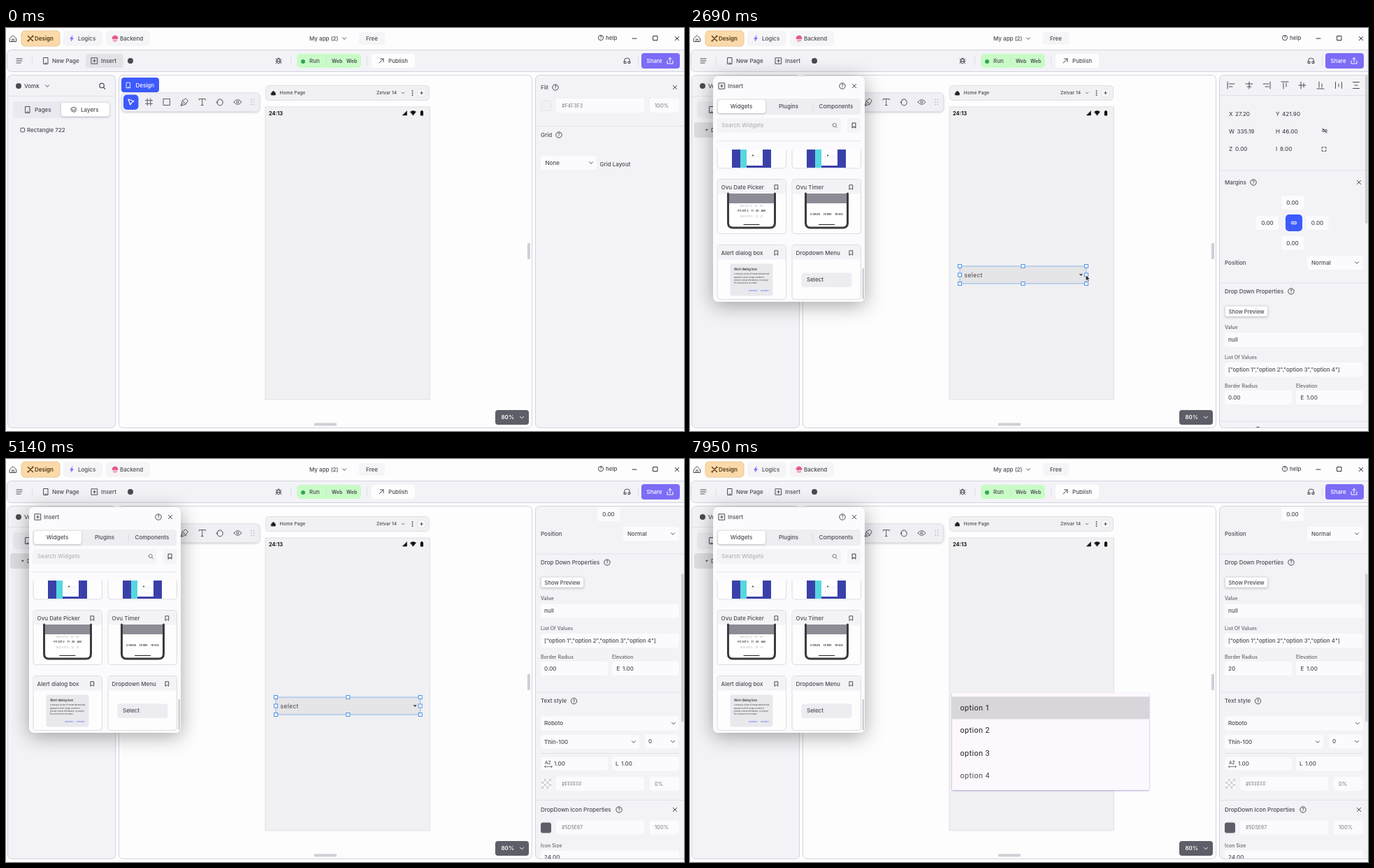
Write an HTML page that moves like this. It is 970 by 577 pixels and loops after 7990 ms.

```html
<!DOCTYPE html>
<html lang="en">
<head>
<meta charset="utf-8">
<title>App builder</title>
<style>
html, body { margin: 0; width: 100%; height: 100%; overflow: hidden; background: #fdfdfe; }
svg { display: block; width: 970px; height: 577px; }
text { font-family: Inter, sans-serif; white-space: pre; }
.material text { font-family: Roboto, sans-serif; }
.soft { filter: drop-shadow(0 1px 1.5px #0003); }
.deep { filter: drop-shadow(0 5px 14px #00000059); }
</style>
</head>
<body>
<svg id="stage" viewBox="0 0 970 577"></svg>
<script>
const LOOP = 7990, SCALE = 0.54;
const INK = '#4a4a52', PANEL = '#f3f3f7', EDGE = '#d2d2df', FIELD = '#fbfbfd', BLUE = '#3d5afe';

// Drawing helpers; text is placed by its vertical centre.
const text = (x, y, s, { size = 8, fill = INK, weight = 500, anchor = 'start', id = '', gap = 0 } = {}) =>
  `<text x="${x}" y="${y + size * 0.36}" font-size="${size}" font-weight="${weight}" fill="${fill}"
    text-anchor="${anchor}" letter-spacing="${gap}" ${id && `id="${id}"`}>${s}</text>`;
const rect = (x, y, w, h, fill, r = 0, stroke = 'none', extra = '') =>
  `<rect x="${x}" y="${y}" width="${w}" height="${h}" rx="${r}" fill="${fill}" stroke="${stroke}" ${extra}/>`;
const path = (d, stroke = INK, width = 1, fill = 'none') =>
  `<path d="${d}" stroke="${stroke}" stroke-width="${width}" fill="${fill}" stroke-linecap="round" stroke-linejoin="round"/>`;
const circle = (x, y, r, fill, stroke = 'none') => `<circle cx="${x}" cy="${y}" r="${r}" fill="${fill}" stroke="${stroke}"/>`;
const group = (attrs, ...parts) => `<g ${attrs}>${parts.join('')}</g>`;
const rule = (x1, x2, y) => path(`M${x1} ${y}H${x2}`, '#dcdce4', 0.8);
const bar = (x, y = 47) => path(`M${x} ${y - 6}v12`, '#d8d8df', 0.8);

const ICONS = {
  down: 'M-2.5 -1.2L0 1.3L2.5 -1.2',
  close: 'M-2.7 -2.7L2.7 2.7M2.7 -2.7L-2.7 2.7',
  home: 'M-4.5 0L0 -4.5L4.5 0V4.5H-4.5ZM-1.3 4.5V1H1.3V4.5',
  tools: 'M-3.5 -3.5L3.5 3.5M3.5 -3.5L-3.5 3.5M-4 3L-3 4M3 -4L4 -3',
  bolt: 'M1 -4L-2.5 .8H0L-1 4L2.5 -.8H0Z',
  menu: 'M-4 -3H4M-4 0H4M-4 3H2',
  page: 'M-3 -4.5H3V4.5H-3ZM-1 3H1',
  insert: 'M-4.2 -4.2H4.2V4.2H-4.2ZM-2 0H2M0 -2V2',
  bug: 'M-2 -2.5H2V2.5L0 4L-2 2.5ZM-4 -2.5L-2 -1M4 -2.5L2 -1M-4 .7H4M-4 3.7L-2 2M4 3.7L2 2M-1 -3.8H1',
  out: 'M-3 3L3 -3M-1.5 -3H3V1.5',
  head: 'M-4 2V0A4 4 0 0 1 4 0V2M-4 1H-1.5V3.5H-4ZM4 1H1.5V3.5H4Z',
  share: 'M-4 0V4H4V0M0 1.5V-4.5M-2.3 -2.3L0 -4.5L2.3 -2.3',
  search: 'M-3 -.5A2.7 2.7 0 1 0 2.4 -.5A2.7 2.7 0 1 0 -3 -.5M1.7 1.7L3.6 3.6',
  bookmark: 'M-2.2 -3.2H2.2V3.2L0 1.5L-2.2 3.2Z',
  arrow: 'M-4 -4L4 -1.2L.8 .6L-1.2 4Z',
  frame: 'M-5 -2.3H5M-5 2.3H5M-2.3 -5V5M2.3 -5V5',
  box: 'M-4.5 -4.5H4.5V4.5H-4.5Z',
  pen: 'M-5 5L-3 -2L2 -5L5 -2L2 3ZM-5 5L0 0M-3 -2L2 3',
  type: 'M-4.5 -3V-4.5H4.5V-3M0 -4.5V4.5M-1.5 4.5H1.5',
  hand: 'M-3.5 1V-2.5Q-2.5 -4 -1.5 -2.5V-4Q-.5 -5.5 .5 -4V-3.5Q1.5 -5 2.3 -3.5V-2Q3.5 -3 4 -1.5V2Q3 5 0 5Q-3 5 -5 0Q-4 -1 -3.5 1',
  eye: 'M-5.5 0Q0 -7 5.5 0Q0 7 -5.5 0M-1.5 0A1.5 1.5 0 1 0 1.5 0A1.5 1.5 0 1 0 -1.5 0',
  layers: 'M-4 -1.5L0 -4L4 -1.5L0 1ZM-4 1L0 3.5L4 1',
  link: 'M-.8 -1.8H-2A1.8 1.8 0 0 0 -2 1.8H-.8M.8 -1.8H2A1.8 1.8 0 0 1 2 1.8H.8M-1.7 0H1.7',
  expand: 'M-3.2 -1V-3.2H-1M1 -3.2H3.2V-1M3.2 1V3.2H1M-1 3.2H-3.2V1'
};
const icon = (name, x, y, { color = INK, width = 1, fill = 'none', size = 1 } = {}) =>
  group(`transform="translate(${x} ${y}) scale(${size})"`, path(ICONS[name], color, width, fill));
const help = (x, y, r = 4.2) => circle(x, y, r, 'none', INK) + text(x, y, '?', { size: r * 1.6, anchor: 'middle', weight: 600 });
const field = (x, y, w, label, opts) => rect(x, y - 10, w, 20, FIELD, 3) + text(x + 5, y, label, opts);
const select = (x, y, w, label) => field(x, y, w, label) + icon('down', x + w - 8, y);
const heading = (y, label, helpX, closable = true) =>
  text(765, y, label) + help(helpX, y) + (closable ? icon('close', 957, y) : '');
const colour = (y, hex, alpha) => field(787, y, 126, '') + field(921, y, 42, '') +
  text(795, y, hex, { size: 7, fill: '#777780', weight: 400 }) + text(928, y, alpha, { size: 7.6, fill: '#777780', weight: 400 });
const thin = { size: 7, fill: '#62626a', weight: 500 };

function topBars() {
  return [
    icon('home', 10, 15),
    rect(22, 4, 55, 22, '#fbd9a9', 5, '#ebc995'), icon('tools', 35, 15, { color: '#5f4212', width: 1.5 }),
    text(41, 15, 'Design', { weight: 600, fill: '#4e3916' }),
    rect(82, 4, 56, 22, '#f5f5f8', 5), icon('bolt', 94, 15, { color: '#7b61ff', fill: '#7b61ff', width: .5 }), text(103, 15, 'Logics'),
    rect(143, 4, 63, 22, '#f5f5f8', 5), path('M152 15a4 4 0 0 1 8 0z', '#e8568c', 1, '#e8568c'),
    path('M154 17v2M156 17v2.5M158 17v2', '#e8568c'), text(163, 15, 'Backend'),
    text(434, 15, 'My app (2)'), icon('down', 484, 15),
    rect(505, 6, 37, 18, '#f5f5f8', 4), text(515, 15, 'Free'),
    help(851, 14, 3.6), text(858, 14, 'help'),
    path('M896 15h6M926 11.5h6v6h-6z', '#333'), icon('close', 960, 15, { color: '#333' }),

    rect(1.5, 31.5, 980, 31, PANEL, 6, EDGE), icon('menu', 19, 47), bar(37.5),
    icon('page', 57, 47), text(66, 47, 'New Page'),
    rect(114, 37, 54, 20, '#e3e3e7', 4, 'none', 'id="insertHover"'),
    icon('insert', 126.5, 47), text(136, 47, 'Insert'), circle(178, 47, 4, INK),
    icon('bug', 390, 47), bar(407.5),
    rect(416, 37, 92, 20, '#c9fbc6', 5), circle(425, 48, 3, '#31a852'), text(434, 47, 'Run'), bar(458.5),
    text(466, 47.5, 'Web', { size: 7, weight: 600 }), text(487, 47.5, 'Web', { size: 7, weight: 600 }), bar(516.5),
    rect(523, 37, 62, 20, '#fdfdfe', 4), icon('out', 537, 47), text(547, 47, 'Publish'),
    icon('head', 888.5, 47), bar(904.5),
    rect(909, 36, 55, 22, '#7c6cf6', 4), text(916.5, 47, 'Share', { fill: '#fff' }), icon('share', 950, 47, { color: '#fff' })
  ].join('');
}

function leftPanel() {
  return [
    rect(2.5, 67.5, 154, 505, PANEL, 6, EDGE),
    circle(18, 83, 4, INK), text(26, 83, 'Vomk'), icon('down', 59, 83), icon('search', 137.5, 83, { size: 1.2 }), rule(3, 156, 97.5),
    rect(10, 105, 139, 24, '#e9e9ef', 5), rect(79, 107, 69, 19.5, '#fff', 4, 'none', 'class="soft"'),
    icon('page', 31, 117), text(41, 117, 'Pages'), icon('layers', 97, 117), text(107, 117, 'Layers'),
    group('id="layerBefore"', rect(21, 143.2, 5.6, 5.6, 'none', 1, INK), text(30, 146, 'Rectangle 722')),
    group('id="layerAfter"', rect(6, 135, 147, 22, '#dcdce1', 4), path('M22.5 145h3l-1.5 2z', INK, .4, INK), text(30, 146, 'Dropdown'))
  ].join('');
}

function canvasArea() {
  const tools = ['frame', 'box', 'pen', 'type', 'hand', 'eye'].map((name, i) => icon(name, 204.5 + i * 25.4, 106, { color: '#5a5a62' }));
  let grip = '';
  for (let i = 0; i < 6; i++) grip += circle(351 + i % 2 * 3.5, 102.5 + (i >> 1) * 3.5, .8, '#b0b0b8');
  return [
    rect(161.5, 67.5, 591, 505, '#fdfdfe', 6, EDGE),
    rect(165, 71, 54, 21, BLUE, 4), icon('page', 175, 82, { color: '#fff', size: .85 }), text(185.5, 82, 'Design', { fill: '#fff' }),
    rect(165.5, 93, 197, 26.5, '#efeff4', 5, '#e0e0e8', 'class="soft"'),
    rect(168, 95.5, 21.5, 21.5, BLUE, 5), icon('arrow', 179, 106, { color: '#fff', width: 1.2 }), ...tools, grip,
    rect(371.5, 82.5, 234, 21, '#f1f1f4', 5, '#dedee5'),
    icon('home', 382.5, 93, { color: '#222', fill: '#222', size: .65 }), text(391.5, 93, 'Home Page', { size: 6.7 }),
    text(530, 93, 'Zelvar 14', { size: 6.7 }), icon('down', 568, 93, { size: .75 }),
    ...[90, 93, 96].map(y => circle(581.5, y, .9, INK)), circle(594.5, 93, 6, '#fafafd', '#e2e2e8'), path('M592.5 93h4M594.5 91v4'),
    rect(371, 113, 235.5, 419, '#f1f0f2', 0, '#e0e0e6'),
    text(376, 122, '24:13', { size: 7.4, weight: 700, fill: '#111' }),
    path('M567.5 125h6v-6z', '#111', .5, '#111'), path('M578.5 120q4 -3 8 0l-4 5z', '#111', .5, '#111'),
    rect(592.8, 119, 4.2, 6.5, '#111', .7), rect(594, 118, 1.8, 1.5, '#111'),
    rect(746, 308, 4, 23, '#cfcfd5', 1), rect(441, 565.5, 32, 4, '#cfcfd5', 1),
    rect(700, 547, 48, 21, '#5d5e67', 4), text(708.5, 557.5, '80%', { fill: '#fff', weight: 600 }), icon('down', 738, 557.5, { color: '#fff' })
  ].join('');
}

function fillProperties() {
  return [
    heading(85, 'Fill', 786), rect(765.5, 104, 14.5, 14.5, '#f1f0f1', 3, '#e4e4e8'), colour(111, '#F4F3F3', '100%'),
    rule(757, 970, 140.5), heading(153, 'Grid', 791, false),
    rect(765, 183, 80, 20, FIELD, 3), text(771.5, 193, 'None'), icon('down', 837, 193), text(849.5, 195, 'Grid Layout')
  ].join('');
}

function widgetProperties() {
  const align = [774, 800, 825, 851, 876, 902, 928, 953].map((x, i) => {
    const d = ['M-5 -5V5M-3 -2H5M-3 2H2', 'M0 -5V5M-5 -2H5M-3 2H3', 'M5 -5V5M3 -2H-5M3 2H-2', 'M-5 -5H5M-2 -3V5M2 -3V2',
      'M-5 0H5M-2 -5V5M2 -3V3', 'M-5 5H5M-2 3V-5M2 3V-2', 'M-4.5 -4.5V4.5M4.5 -4.5V4.5M0 -2V2', 'M-4.5 -4.5H4.5M-4.5 4.5H4.5M-2 0H2'][i];
    return group(`transform="translate(${x} 82)"`, path(d));
  });
  const numbers = [['X', 771, 123, 'posX'], ['Y', 838, 123, 'posY'], ['W', 771, 148, 'sizeW'], ['H', 838, 148, '46.00'], ['Z', 771, 173.5, '0.00'], ['I', 838, 173.5, '8.00']]
    .map(([k, x, y, v]) => text(x, y, k) + text(x + (k === 'I' ? 6 : k === 'W' ? 11.5 : 9), y, /\d/.test(v) ? v : '', { id: /\d/.test(v) ? '' : v }));
  const margins = [[862, 250], [826, 279], [897.5, 279], [862, 308]]
    .map(([x, y]) => rect(x - 16, y - 10, 32, 20, FIELD, 3) + text(x, y, '0.00', { anchor: 'middle' }));
  const fontPair = y => select(765, y, 198, 'Roboto') + select(765, y + 26.5, 141, 'Thin-100') + select(914, y + 26, 48, '0');
  let checker = rect(766, 687, 14, 14, '#fff', 2);
  for (let i = 0; i < 16; i++) if ((i + (i >> 2)) % 2) checker += rect(766 + i % 4 * 3.5, 687 + (i >> 2) * 3.5, 3.5, 3.5, '#d3d3d8');
  return [
    ...align, rule(757, 970, 96.5), ...numbers,
    icon('link', 908, 147, { size: .9 }), path('M905 143.5l6 7'), icon('expand', 907, 173.5, { size: .9 }),
    rule(757, 970, 204), heading(221, 'Margins', 806), ...margins,
    rect(852, 267, 24, 24, BLUE, 5), icon('link', 864, 279, { color: '#fff' }),
    text(765, 336, 'Position'), rect(883, 326, 80, 20, FIELD, 3), text(889, 336, 'Normal'), icon('down', 954, 336), rule(757, 970, 365),
    heading(377, 'Drop Down Properties', 860, false),
    rect(765.5, 398, 61, 15, '#fdfdfe', 2, '#dcdce2', 'class="soft"'), text(770.5, 406, 'Show Preview', { size: 7.6 }),
    text(765, 428.5, 'Value', thin), field(765, 446.5, 198, 'null'),
    text(765, 471, 'List Of Values', thin), field(765, 489, 198, '["option 1","option 2","option 3","option 4"]', { size: 7.8 }),
    text(765, 512, 'Border Radius', thin), text(867, 512, 'Elevation', thin),
    rect(765, 519, 96, 20, FIELD, 3, 'none', 'id="radiusField"'), text(770, 529, '0.00', { id: 'radius' }),
    field(867, 529, 96, ''), text(873.5, 529, 'E'), text(882, 529, '1.00'), rule(757, 970, 563),
    heading(575.5, 'Text style', 812.5, false), fontPair(607.5), rule(765, 963, 650.5),
    rect(765.5, 656, 95.5, 18.5, FIELD, 3, 'none', 'id="spacingField"'),
    text(771, 664, 'AZ', { size: 6.5 }), path('M771 669.5h10M772 668l-1.5 1.5l1.5 1.5M780 668l1.5 1.5l-1.5 1.5', INK, .7), text(784, 665.5, '1.00'),
    field(867, 665.5, 96, ''), text(872, 665.5, 'L'), text(880, 665.5, '1.00'),
    checker, colour(694, '#FFFFFF', '0%'), rule(757, 970, 717.5),
    heading(731, 'DropDown Icon Properties', 877), rect(765, 749.5, 15, 15, '#5d5e67', 3), colour(756.5, '#5D5E67', '100%'),
    text(765, 782, 'Icon Size', thin), field(765, 799.5, 198, '24.00'), rule(757, 970, 818.5),
    heading(832.5, 'Hint Properties', 833, false), field(765, 859, 198, 'select'), fontPair(886.5)
  ].join('');
}

// Widget cards in the Insert window.
function phoneThumb(x, w, rows) {
  const cx = x + w / 2;
  return rect(x + 1.5, 20.5, w - 3, 49, '#fff') + rect(x + 2, 20.5, w - 4, 14, '#8d8c96') +
    path(`M${x + 1.5} 20.5v42q0 7 7 7h${w - 17}q7 0 7 -7v-42`, '#3b3b3d', 3) + path(`M${cx - 11} 65h22`, '#222', 1.2) +
    rows.map(([s, y, fill]) => text(cx, y, s, { size: 3.8, anchor: 'middle', fill, weight: 600 })).join('');
}
const thumbs = {
  calendar: () => rect(21, 21, 56, 56, '#3a40a9') + rect(33, 21, 9, 56, '#55d6e0') + rect(42, 21, 23, 53, '#fff') +
    path('M44 61h19M44 68h19M48 58v14M53 58v14M58 58v14', '#e6e6ee', .5) + circle(51, 59.5, 1, '#333'),
  date: () => phoneThumb(14, 70, [['Sat Oct 4    10   29', 38, '#c4c4c8'], ['Fri Oct 3    11   30   AM', 45.5, '#333'], ['Sun Oct 5    12   31', 53, '#c4c4c8']]),
  timer: () => phoneThumb(18, 63, [['0 hours     18 min     18 sec', 50, '#333']]),
  alert: () => rect(18.5, 27, 61, 46, '#e9e9ed', 3) + text(24, 34.5, 'Alert dialog box', { size: 4.4, fill: '#222' }) +
    ['A dialog is a type of modal window that', 'appears in front of app content to', 'provide critical information, or prompt', 'for a decision to be made.']
      .map((s, i) => text(24, 42 + i * 4.2, s, { size: 2.7, fill: '#555' })).join('') +
    text(45, 66, 'ACTION 2', { size: 2.7, fill: BLUE }) + text(62, 66, 'ACTION 1', { size: 2.7, fill: BLUE }),
  dropdown: () => rect(13.5, 40, 72, 20.5, '#ececf1', 4) + text(21, 50, 'Select'),
  plain: () => rect(20, 36, 58, 24, '#ececf1', 4)
};
const card = (x, y, title, thumb) => group(`transform="translate(${x} ${y})"`,
  rect(0, 0, 98.5, 78, '#fdfdfe', 4, '#dcdce3'), rect(.5, .5, 97.5, 20.5, PANEL, 3.5),
  thumbs[thumb](), text(5.5, 11.5, title), icon('bookmark', 84.5, 11.5));

function insertWindow() {
  const names = ['Text', 'Button', 'Image', 'Icon', 'Switch', 'Slider', 'Check box', 'Radio', 'Video', 'Web view'];
  const rows = names.map((n, i) => card(39 + i % 2 * 107, 123 - 94 * (5 - (i >> 1)), n, 'plain'));
  return [
    rect(33, 69, 217, 323, '#fbfbfd', 7, 'none', 'class="deep"'),
    icon('insert', 45.5, 83), text(54, 83, 'Insert'), help(218, 83), icon('close', 235, 83),
    rect(38, 101, 206, 23, '#ededf2', 4), rect(40, 103, 68, 19, '#fff', 4, 'none', 'class="soft"'), bar(175.5, 112.5),
    ...[['Widgets', 73.5], ['Plugins', 141], ['Components', 209]].map(([s, x]) => text(x, 112.5, s, { anchor: 'middle' })),
    rect(38, 129, 178, 21, '#f4f4f7', 4), text(45, 139, 'Search Widgets', { fill: '#b3b3bb' }), icon('search', 207, 139.5, { size: .95, color: '#77777f' }),
    rect(225, 129, 19, 21, '#f4f4f7', 4), icon('bookmark', 234.5, 139.5, { size: 1.1 }), rule(38, 244, 162),
    group('clip-path="url(#listClip)"', group('id="list"', ...rows,
      card(39, 123, 'Date Picker', 'calendar'), card(146, 123, 'Date Range', 'calendar'),
      card(39, 216.5, 'Ovu Date Picker', 'date'), card(146, 216.5, 'Ovu Timer', 'timer'),
      card(39, 310.5, 'Alert dialog box', 'alert'), card(146, 310.5, 'Dropdown Menu', 'dropdown'))),
    rect(246.5, 344, 2.5, 44, '#cdcdd3', 1, 'none', 'id="listBar"')
  ].join('');
}

function previewMenu() {
  const rows = [1, 2, 3, 4].map(n => {
    const y = 340.3 + (n - 1) * 32.1;
    return group('class="option"', rect(375, y, 282, 32.1, n === 1 ? '#d9d6db' : '#f3eff3', 0, 'none', 'class="shade"'),
      text(386.5, y + 16.2, `option ${n}`, { size: 10.8, weight: 400, fill: '#1d1b20', gap: .4 }));
  });
  return rect(375, 335, 282, 139, '#fdf8fe', 1.5, 'none', 'id="menuBack" style="filter:drop-shadow(0 1px 1px #5a50a080)"') + rows.join('');
}

const stage = document.getElementById('stage');
stage.innerHTML = `<defs><clipPath id="listClip">${rect(34, 174, 215, 216)}</clipPath>
  <clipPath id="sideClip">${rect(757, 68, 213, 504)}</clipPath></defs>` + [
  rect(0, 0, 970, 577, '#fdfdfe'), topBars(), leftPanel(), canvasArea(),
  group('id="widget" class="material"', rect(0, 0, 1, 25, '#e5e4e6', 0, '#8bb9ee', 'id="widgetBox"'),
    text(0, 12.8, 'select', { size: 8.8, weight: 400, id: 'hint', gap: .5 }), path('M-2 -1h4l-2 2z', '#333', .5, '#333').replace('<path', '<path id="caret"'),
    ...Array.from({ length: 8 }, () => `<rect class="handle" width="5" height="5" fill="#fff" stroke="#4c93e6"/>`)),
  group('id="menu" class="material"', previewMenu()),
  rect(757.5, 67.5, 220, 505, PANEL, 6, EDGE),
  group('clip-path="url(#sideClip)"', group('id="fillProps"', fillProperties()), group('id="widgetProps"', widgetProperties())),
  rect(966, 68, 3.5, 212, '#cdcdd3', 1.5, 'none', 'id="sideBar"'),
  group('id="insertWindow"', insertWindow()),
  group('id="dragged" class="soft"', card(0, 0, 'Dropdown Menu', 'dropdown')),
  group('id="cursor"', path('M0 0V8L2 6.2L3.4 9L4.8 8.4L3.4 5.7H6Z', '#fff', .6, '#222'))
].join('');

const el = Object.fromEntries([...stage.querySelectorAll('[id]')].map(e => [e.id, e]));
const handles = stage.querySelectorAll('.handle'), options = stage.querySelectorAll('.option'), shades = stage.querySelectorAll('.shade');
const clamp = v => Math.min(1, Math.max(0, v));
const ramp = (t, a, b) => { const p = clamp((t - a) / (b - a)); return p * p * (3 - 2 * p); };
const show = (e, on) => { e.style.display = on ? '' : 'none'; };
const put = (e, x, y) => e.setAttribute('transform', `translate(${x} ${y})`);
const set = (e, attrs) => { for (const k in attrs) e.setAttribute(k, attrs[k]); };

// Position along [time, x, y] keys.
function follow(t, keys) {
  let [, x, y] = keys[0];
  for (let i = 1; i < keys.length; i++) {
    const p = ramp(t, keys[i - 1][0], keys[i][0]);
    x += (keys[i][1] - keys[i - 1][1]) * p;
    y += (keys[i][2] - keys[i - 1][2]) * p;
  }
  return [x, y];
}
const DRAG = [[780, 146, 310.5], [880, 183.5, 324], [1300, 395, 286]];
const POINTER = [[1300, 470, 300], [1450, 488, 309.5], [1770, 511, 362], [1880, 511, 362], [2050, 405, 354], [2450, 386, 354],
  [2700, 567, 354], [3150, 592, 354], [3400, 592, 354], [3770, 704, 355], [3900, 760, 362]];

function drawWidget(t) {
  const moved = ramp(t, 1450, 1770);
  const left = 382 + 23 * moved - 19 * ramp(t, 2050, 2450);
  const right = 544 + 23 * moved + 25.76 * ramp(t, 2700, 3150);
  const top = 288.5 + 52.5 * moved, width = right - left;
  put(el.widget, left, top);
  set(el.widgetBox, { width });
  set(el.hint, { x: 6.5 });
  put(el.caret, width - 7.5, 12.5);
  handles.forEach((h, i) => {
    const cell = i < 4 ? i : i + 1;
    set(h, { x: cell % 3 * width / 2 - 2.5, y: Math.floor(cell / 3) * 12.5 - 2.5 });
  });
  const live = t > 1850;
  el.posX.textContent = live ? ((left - 371.312) / SCALE).toFixed(2) : '19.92';
  el.posY.textContent = live ? '421.90' : '324.95';
  el.sizeW.textContent = (Math.round(width / SCALE * 100) / 100).toFixed(2);
}

function drawMenu(t) {
  const opened = t < 7000 ? 5500 : 7660;
  const p = clamp((t - opened) / 300);
  show(el.menu, p > 0 && !(t > 6250 && t < 7000));
  el.menu.style.opacity = Math.min(clamp(p * 4), t < 7000 ? 1 - clamp((t - 6150) / 100) : 1);
  set(el.menuBack, { height: 43 + 96 * ramp(p, .25, .5) });
  options.forEach((o, i) => { o.style.opacity = i ? clamp((p - .5 - (i + 1) * .091) / .136) : 1; });
  const hovered = t < 7000 ? Math.floor((t - 5600) / 65) : 0;
  shades.forEach((s, i) => show(s, i === 0 || i === Math.min(3, hovered)));
}

function draw(t) {
  const dropped = t >= 1300;
  show(el.insertHover, t < 160);
  show(el.insertWindow, t >= 100);
  const listScroll = ramp(t, 220, 680);
  put(el.list, 0, 470 * (1 - listScroll));
  set(el.listBar, { y: 174 + 170 * listScroll });
  show(el.listBar, (t > 220 && t < 800) || dropped);

  show(el.dragged, t >= 780 && !dropped);
  put(el.dragged, ...follow(t, DRAG));
  for (const name of ['layerAfter', 'widgetProps', 'sideBar', 'widget']) show(el[name], dropped);
  for (const name of ['layerBefore', 'fillProps']) show(el[name], !dropped);
  drawWidget(t);
  show(el.cursor, dropped && t < 3880);
  put(el.cursor, ...follow(t, POINTER));

  const scroll = 343.5 * ramp(t, 3900, 4260) - 114.5 * ramp(t, 4700, 5100);
  put(el.widgetProps, 0, -scroll);
  put(el.sideBar, 0, scroll * .42);
  set(el.spacingField, { stroke: t > 4200 && t < 4700 ? '#d0d0d8' : 'none' });
  set(el.radiusField, { stroke: t > 6450 && t < 7400 ? '#b9b9c6' : 'none' });
  el.radius.textContent = t < 6700 ? '0.00' : t < 6800 ? '' : t < 6920 ? '2' : '20';
  drawMenu(t);
}

function tick() {
  draw(performance.now() % LOOP);
  requestAnimationFrame(tick);
}
tick();
</script>
</body>
</html>
```
